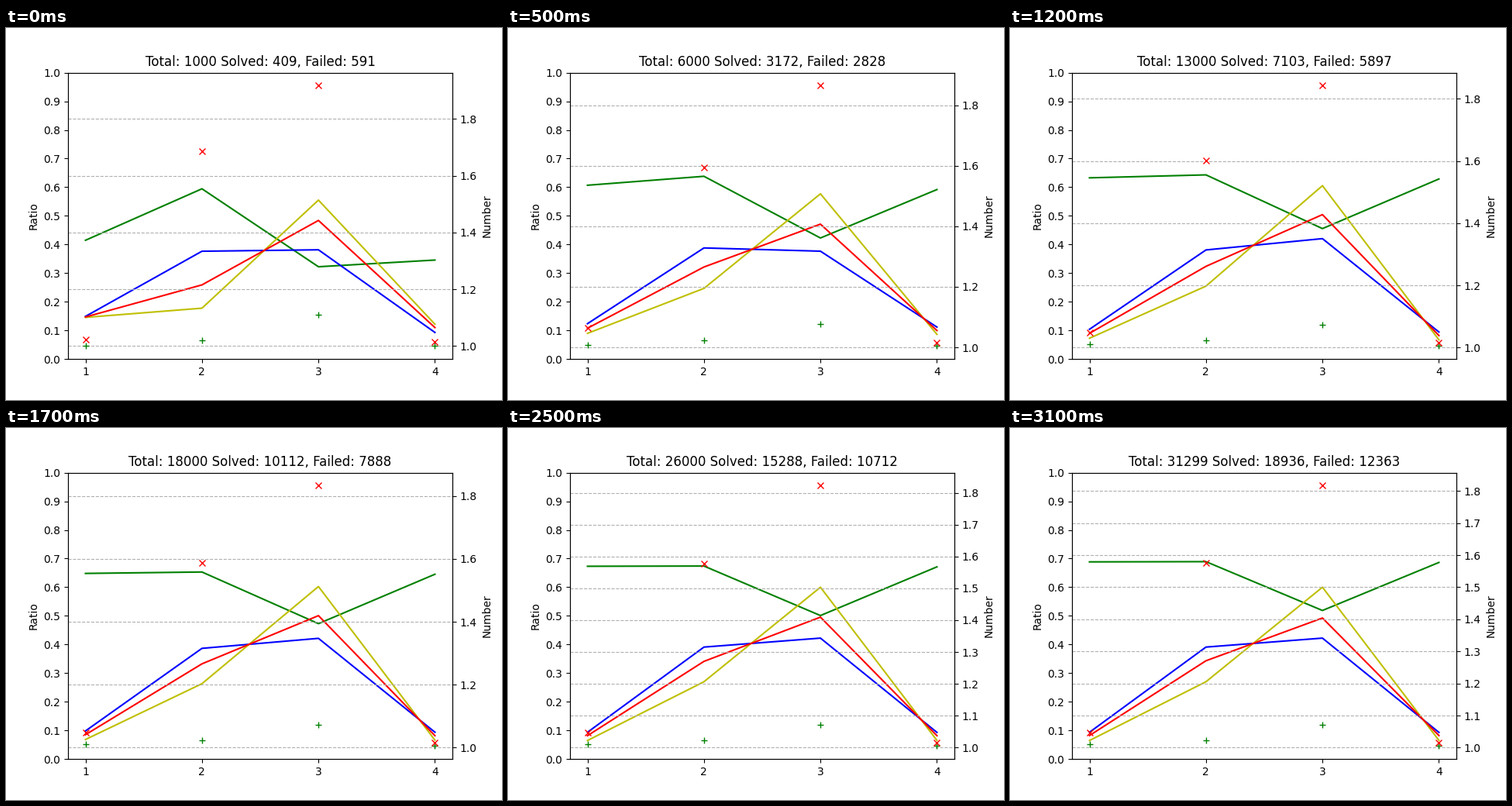
A matplotlib script that plays this animation: 640x480 px, repeating every 3200 ms.

```python
import numpy as np
import matplotlib.pyplot as plt
from matplotlib.animation import FuncAnimation

FRAMES, INTERVAL = 32, 100
STEP, LAST = 1000, 31299
GROUPS = np.arange(1, 5)
KNOTS = np.array([1, 6, 13, 26])  # thousands of runs


def keyed(n, *values):
    """Running averages drift between key values as 1/n."""
    return np.interp(-1 / n, -1 / KNOTS, values)


def settle(n, start, end):
    return end + (start - end) / n


def fill_last(*shares):
    return np.array([*shares, 1 - sum(shares)])


def solved_count(n):
    return int(round(np.interp(
        n, [1, 6, 13, 18, 22, 26, LAST / STEP],
        [409, 3172, 7103, 10112, 12619, 15288, 18936])))


def solved_shares(n):
    return fill_last(keyed(n, 0.149, 0.1236, 0.104, 0.0935),
                     keyed(n, 0.3765, 0.388, 0.381, 0.391),
                     keyed(n, 0.3815, 0.3767, 0.4205, 0.4223))


def failed_shares(n):
    return fill_last(keyed(n, 0.1455, 0.0898, 0.0727, 0.0648),
                     keyed(n, 0.1777, 0.2468, 0.2547, 0.27),
                     keyed(n, 0.555, 0.577, 0.6054, 0.6))


def solved_means(n):
    return np.array([settle(n, 1, 1.0105), settle(n, 1.0195, 1.0227),
                     settle(n, 1.109, 1.069), settle(n, 1, 1.005)])


def failed_means(n):
    return np.array([keyed(n, 1.0233, 1.063, 1.049, 1.048),
                     keyed(n, 1.686, 1.5946, 1.601, 1.577),
                     1.9177 - 0.0293 * np.log(n),
                     settle(n, 1.0139, 1.0167)])


fig, ax = plt.subplots(figsize=(6.4, 4.8), dpi=100)
ax.set_ylabel("Ratio")
ax.set_xticks(GROUPS)
ax.set_xlim(0.85, 4.15)
ax.set_yticks(np.arange(11) / 10)
ax.set_ylim(0, 1)
title = ax.set_title("")

num_ax = ax.twinx()
num_ax.set_ylabel("Number")
num_ax.grid(linestyle="--", axis="y")

rate, solved_line, failed_line, total_line = [
    ax.plot(GROUPS, GROUPS * 0.0, color)[0] for color in "gbyr"
]
solved_marks, failed_marks = [
    num_ax.plot(GROUPS, GROUPS * 0.0, style)[0] for style in ("g+", "rx")
]


def draw(i):
    total = min(STEP * (i + 1), LAST)
    n = total / STEP
    done = solved_count(n)
    title.set_text(f"Total: {total} Solved: {done}, Failed: {total - done}")

    solved, failed = solved_shares(n), failed_shares(n)
    both = (solved * done + failed * (total - done)) / total
    solved_line.set_ydata(solved)
    failed_line.set_ydata(failed)
    total_line.set_ydata(both)
    rate.set_ydata(solved * done / (both * total))

    means = solved_means(n), failed_means(n)
    solved_marks.set_ydata(means[0])
    failed_marks.set_ydata(means[1])
    low, high = np.min(means), np.max(means)
    pad = 0.05 * (high - low)
    num_ax.set_ylim(low - pad, high + pad)
    return []


anim = FuncAnimation(fig, draw, frames=FRAMES, interval=INTERVAL,
                     repeat=True, repeat_delay=0)
plt.show()
```
